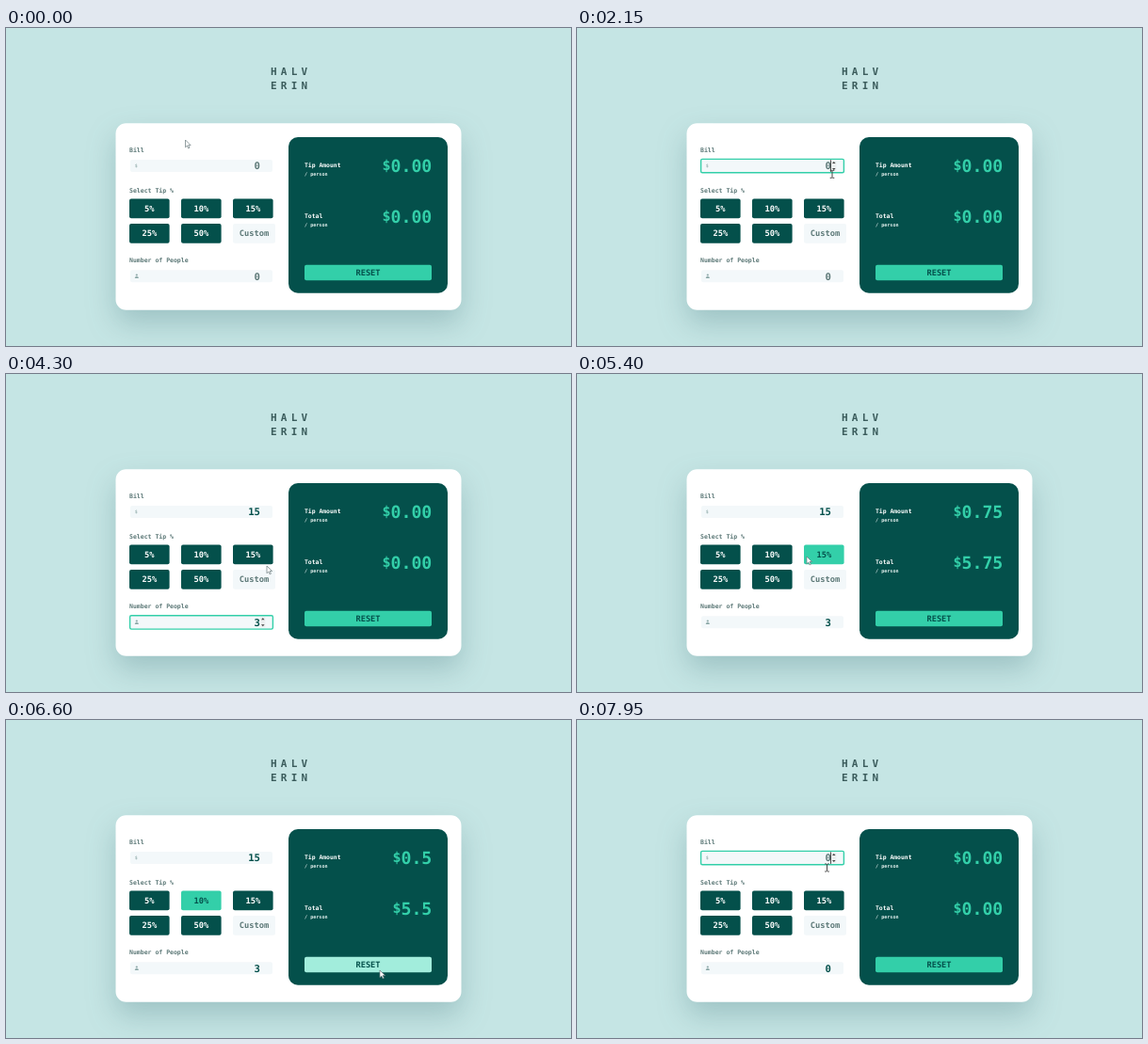
Write an HTML page that moves like this. It is 600 px wide and 338 px high and loops after 8 s.

```html
<!DOCTYPE html>
<html lang="en">
<head>
<meta charset="utf-8">
<title>Tip calculator</title>
<style>
  html, body { margin: 0; height: 100%; overflow: hidden; background: #c5e5e4; }
  svg { display: block; width: 600px; height: 338px; }
  text { font-family: "DejaVu Sans Mono", monospace; font-weight: bold; text-rendering: geometricPrecision; white-space: pre; }
  .card { filter: drop-shadow(0 14px 15px rgba(50, 105, 110, .27)); }
</style>
</head>
<body>
<svg viewBox="0 0 600 338"><g id="base"></g><g id="live"></g></svg>
<script>
const LOOP = 8000;
const DARK = '#04504b', GREEN = '#33cfa9', LIGHT = '#a2eddc', GRAY = '#5c7877', FIELD = '#f3f8fa';

// Cursor positions: time, x, y
const PATH = [
  [0, 190.5, 119], [550, 190.5, 119], [1080, 271, 155.3], [2750, 271, 155.3], [2950, 246.5, 238],
  [3150, 248, 266], [3350, 244, 270], [4100, 244, 270], [4300, 277, 204], [4850, 256, 196],
  [5200, 256, 196], [5400, 244, 194], [5850, 208, 196], [6050, 208, 196], [6450, 375, 293],
  [6600, 397, 266], [6850, 390, 260], [6950, 390, 260], [7650, 268, 154], [7950, 265.5, 157], [8000, 265.5, 157]
];
const CLICK = { bill: 1350, people: 3150, tip15: 4800, tip10: 5850, reset: 6900, again: 7650 };
const BUTTONS = [['5%', 131, 181.5], ['10%', 186, 181.5], ['15%', 241, 181.5], ['25%', 131, 208], ['50%', 186, 208]];
const BILL_Y = 139, PEOPLE_Y = 256.3;

const rect = (x, y, w, h, r, fill, extra = '') =>
  `<rect x="${x}" y="${y}" width="${w}" height="${h}" rx="${r}" fill="${fill}" ${extra}/>`;
const text = (s, x, y, size, fill, anchor = 'start', extra = '') =>
  `<text x="${x}" y="${y}" font-size="${size}" fill="${fill}" text-anchor="${anchor}" ${extra}>${s}</text>`;
const path = (d, fill, extra = '') => `<path d="${d}" fill="${fill}" ${extra}/>`;
const clamp = v => Math.max(0, Math.min(1, v));
const inside = ([px, py], x, y, w, h) => px >= x && px <= x + w && py >= y && py <= y + h;

// Monotone cubic interpolation of one cursor axis
function along(t, axis) {
  const slope = i => PATH[i] && PATH[i + 1] ? (PATH[i + 1][axis] - PATH[i][axis]) / (PATH[i + 1][0] - PATH[i][0]) : 0;
  const tangent = i => {
    const a = slope(i - 1), b = slope(i);
    return a * b > 0 ? 2 * a * b / (a + b) : 0;
  };
  const i = Math.max(0, PATH.findIndex(p => p[0] > t) - 1);
  const span = PATH[i + 1][0] - PATH[i][0], u = (t - PATH[i][0]) / span, v = 1 - u;
  return v * v * (1 + 2 * u) * PATH[i][axis] + u * u * (3 - 2 * u) * PATH[i + 1][axis]
    + span * u * v * (v * tangent(i) - u * tangent(i + 1));
}

function label(y, title) {
  return text(title, 317, y, 6.4, '#fff') + text('/ person', 317, y + 9, 5.1, '#e3f0ee');
}

function drawBase() {
  return text('HALV', 281, 50, 11, '#3b5c5c', 'start', 'letter-spacing="4.2"')
    + text('ERIN', 281, 65.3, 11, '#3b5c5c', 'start', 'letter-spacing="4.2"')
    + rect(116.5, 101.3, 367, 198.4, 11, '#fff', 'class="card"')
    + rect(300, 116, 169, 165.7, 10, DARK)
    + text('Bill', 131, 131.8, 6.5, GRAY)
    + text('Select Tip %', 131, 175.2, 6.5, GRAY)
    + text('Number of People', 131, 249, 6.5, GRAY)
    + rect(241, 208, 45, 20.7, 2, FIELD)
    + text('Custom', 263.5, 221.2, 8.7, GRAY, 'middle')
    + label(148.3, 'Tip Amount') + label(202.3, 'Total');
}

function field(y, value, filled, focus, active, hover, caret) {
  let out = rect(132, y + 1, 151, 13, 2, FIELD)
    + text(value, 270, y + 11.3, 10.6, filled ? DARK : GRAY, 'end');
  if (y === BILL_Y) out += text('$', 136.7, y + 9.3, 5, '#9db5b5');
  else out += `<circle cx="138.8" cy="${y + 6.2}" r="1.1" fill="#8ba8a7"/>`
    + path(`M136.7 ${y + 9.8}q0-2.2 2.1-2.2t2.1 2.2z`, '#8ba8a7');
  if (focus > 0) out += rect(131.6, y + .4, 151.8, 14.4, 1.5, 'none', `stroke="${GREEN}" stroke-width="1.4" opacity="${focus}"`);
  if (active || hover) {
    out += rect(270.3, y + 2, 5, 11, 0, '#eceff0')
      + path(`M271 ${y + 5}l1.8-2 1.8 2zM271 ${y + 10}l1.8 2 1.8-2z`, '#444');
  }
  if (caret) out += rect(269.1, y + 1.3, .8, 12.6, 0, '#222');
  return out;
}

function amount(value, y) {
  const left = 452.3 - value.length * 10.96;
  return text(value, 452.3, y, 18.2, GREEN, 'end') + text('$', left, y - 1.6, 15, GREEN, 'end');
}

function drawCursor([x, y], beam) {
  const shape = beam
    ? path('M-2.3-4h1.6l.7.6.7-.6h1.6M0-3.4v6.8M-2.3 4h1.6l.7-.6.7.6h1.6', 'none', 'stroke="#444" stroke-width="1"')
    : path('M0 0v7.8l1.8-1.7 1.3 2.8 1.3-.6-1.3-2.7h2.5z', '#fff', 'stroke="#66787a" stroke-width=".7"');
  return `<g transform="translate(${x} ${y})">${shape}</g>`;
}

function drawLive(t) {
  const pos = [along(t, 1), along(t, 2)];
  const between = (from, to) => t >= from && t < to;
  const fade = (from, to) => Math.min(clamp((t - from) / 150), 1 - clamp((t - to) / 100));
  const blink = since => (t - since) % 800 < 400;

  const onBill = inside(pos, 131, 139, 153, 20), onPeople = inside(pos, 131, 255, 153, 18);
  const cleared = t >= CLICK.reset;
  const billActive = between(CLICK.bill, CLICK.people) || t >= CLICK.again;
  const peopleActive = between(CLICK.people, CLICK.tip15);
  const billFocus = Math.max(fade(CLICK.bill, CLICK.people), fade(CLICK.again, LOOP));
  const bill = cleared || t < 2300 ? '0' : t < 2400 ? '1' : '15';
  const people = !cleared && t >= 3750 ? '3' : '0';
  const billCaret = billActive && blink(t >= CLICK.again ? CLICK.again : t >= 2400 ? 2400 : t >= 2300 ? 2300 : CLICK.bill);
  const peopleCaret = peopleActive && blink(t >= 3750 ? 3750 : CLICK.people);

  const chosen = cleared ? '' : t >= CLICK.tip10 ? '10%' : t >= CLICK.tip15 ? '15%' : '';
  const rate = parseInt(chosen) / 100;
  const money = v => chosen === '10%' ? String(v) : v.toFixed(2);
  const tip = chosen ? 15 * rate / 3 : 0;

  let out = field(BILL_Y, bill, bill !== '0', billFocus, billActive, onBill, billCaret)
    + field(PEOPLE_Y, people, t >= 3750, fade(CLICK.people, CLICK.tip15), peopleActive, onPeople, peopleCaret);
  for (const [name, x, y] of BUTTONS) {
    const hover = inside(pos, x, y, 42.6, 20.7), on = name === chosen;
    out += rect(x, y, 42.6, 20.7, 2, on ? GREEN : hover ? LIGHT : DARK)
      + text(name, x + 21.3, y + 13.4, 8.7, on || hover ? DARK : '#fff', 'middle');
  }
  out += amount(money(tip), 153) + amount(money(tip && 5 + tip), 207)
    + rect(317, 251.7, 135, 16.6, 2, inside(pos, 317, 251.7, 135, 16.6) ? LIGHT : GREEN)
    + text('RESET', 384.5, 263.2, 8.7, DARK, 'middle');
  return out + drawCursor(pos, onBill || onPeople);
}

const live = document.getElementById('live');
document.getElementById('base').innerHTML = drawBase();
function tick() {
  live.innerHTML = drawLive(performance.now() % LOOP);
  requestAnimationFrame(tick);
}
tick();
</script>
</body>
</html>
```
